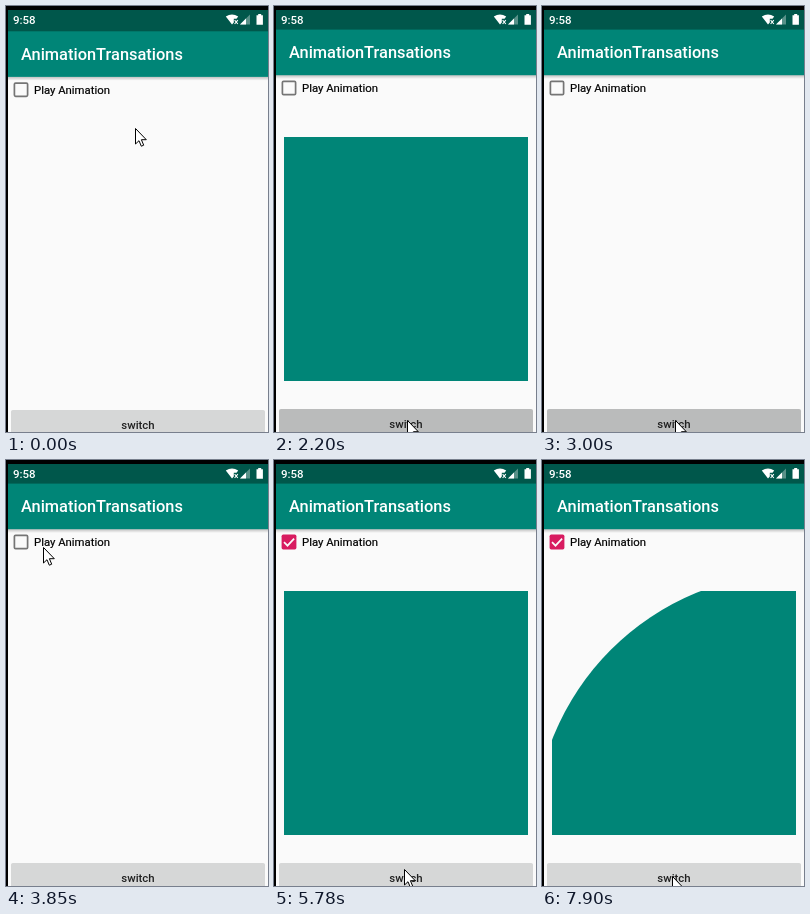
An HTML page for the animation above (8000 ms loop, 262x426 px).

```html
<!DOCTYPE html>
<html lang="en">
<head>
<meta charset="utf-8">
<title>Circular reveal</title>
<style>
  html, body { margin: 0; width: 100%; height: 100%; overflow: hidden; background: #000; }
  svg { display: block; width: 262px; height: 426px; font-family: Roboto, sans-serif; }
</style>
</head>
<body>
<svg viewBox="0 0 262 426">
  <defs>
    <linearGradient id="shade" x2="0" y2="1">
      <stop stop-color="#000" stop-opacity=".24"/>
      <stop offset="1" stop-color="#000" stop-opacity="0"/>
    </linearGradient>
    <clipPath id="hole"><circle id="reveal" cx="254" cy="375" r="0"/></clipPath>
  </defs>

  <rect width="262" height="426" fill="#000"/>
  <rect x="2" y="4" width="260" height="30" fill="#00574b"/>
  <rect x="2" y="60" width="260" height="366" fill="#fafafa"/>

  <g id="top">
    <rect x="2" y="69" width="260" height="4" fill="url(#shade)"/>
    <rect x="2" y="23.6" width="260" height="45.6" fill="#008577"/>
    <text x="15" y="52" font-size="16.4" font-weight="500" fill="#fff">AnimationTransations</text>

    <circle id="ripple" cx="15" cy="82" r="12.5" fill="#d81b60" opacity="0"/>
    <rect id="off" x="8.4" y="75.4" width="13.2" height="13.2" rx="1.2" fill="none" stroke="#757575" stroke-width="1.7"/>
    <g id="on">
      <rect x="7.6" y="74.6" width="14.8" height="14.8" rx="1.7" fill="#d81b60"/>
      <path d="M10 82.2l3.5 3.5 6.6-7" fill="none" stroke="#fafafa" stroke-width="1.7"/>
    </g>
    <text x="28" y="86.3" font-size="11.35" stroke="#000" stroke-width=".2">Play Animation</text>
  </g>

  <rect x="10" y="131" width="244" height="244" fill="#008577" clip-path="url(#hole)"/>

  <g id="bottom">
    <rect x="5" y="403.4" width="254" height="30" rx="2" fill="#000" opacity=".12"/>
    <rect x="5" y="403" width="254" height="30" rx="2" fill="#d6d7d7"/>
    <rect id="shadow" x="5" y="403" width="254" height="30" rx="2" opacity="0"/>
    <text x="132" y="422" font-size="11.4" font-weight="500" fill="#212121" text-anchor="middle">switch</text>
  </g>

  <g fill="#fff">
    <text x="7" y="18" font-size="11.5" font-weight="500">9:58</text>
    <path d="M219.8 10.6Q226 6.6 232.2 10.6L230.5 12.8H227.8V16.6L226 18.6Z"/>
    <path d="M228.6 14.2l3.2 3.8m0-3.8l-3.2 3.8" stroke="#fff" stroke-width="1.1"/>
    <path d="M234 18.5L244 8.5V18.5Z" opacity=".35"/>
    <path d="M234 18.5L240 12.5V18.5Z"/>
    <path d="M250.5 9.3h1.7v-1.2h3v1.2h1.7v9.4h-6.4Z"/>
  </g>

  <path id="cursor" d="M.5.5V16L4 12.7 6.3 18.2 8.7 17.2 6.4 11.7H11.3Z" fill="#fff" stroke="#000"/>
</svg>

<script>
const LOOP = 8000;
const FULL = Math.hypot(244, 244);
const CHECK = 4130;
const clicks = [2200, 3000, 5080, 6310];

// The pointer rests between moves; each move takes a few visible steps.
const home = { x: 129, y: 122 };
const moves = [
  { start: 120, end: 660, steps: 5, x: 65, y: 89 },
  { start: 940, end: 1360, steps: 4, x: 133, y: 414 },
  { start: 3430, end: 3850, steps: 4, x: 37, y: 87 },
  { start: 4270, end: 4680, steps: 4, x: 130, y: 402 },
  { start: 5780, end: 5930, steps: 2, x: 130, y: 416 }
];

const set = (id, name, value) => document.getElementById(id).setAttribute(name, value);
const clamp = p => Math.min(1, Math.max(0, p));
const ease = p => (1 - Math.cos(Math.PI * clamp(p))) / 2;
const snap = (t, start, step) => start + Math.floor((t - start) / step) * step;

function pointer(t) {
  let { x, y } = home;
  for (const move of moves) {
    const gap = (move.end - move.start) / (move.steps - 1);
    const p = ease((snap(t, move.start, gap) - move.start + gap) / (gap * move.steps));
    x += (move.x - x) * p;
    y += (move.y - y) * p;
  }
  return [Math.round(x), Math.round(y)];
}

// Press highlight: full, half, gone.
function press(t, start) {
  return t < start ? 0 : clamp(1 - (snap(t, start, 135) - start) / 270);
}

function radius(t) {
  if (t < clicks[0]) return 0;
  if (t < clicks[1]) return FULL + 1;
  if (t < clicks[2]) return 0;
  if (t < clicks[3]) return FULL * ease((snap(t, clicks[2], 135) - 5009) / 300);
  return FULL * (1 - ease((snap(t, clicks[3], 132) - 6260) / 5000));
}

function draw(t) {
  const early = t < 120;
  const checked = t >= CHECK;
  set('cursor', 'transform', `translate(${pointer(t)})`);
  set('shadow', 'opacity', .13 * Math.max(...clicks.map(c => press(t, c))));
  set('ripple', 'opacity', .26 * press(t, CHECK));
  set('reveal', 'r', radius(t));
  set('on', 'visibility', checked ? 'visible' : 'hidden');
  set('off', 'visibility', checked ? 'hidden' : 'visible');
  set('top', 'transform', `translate(0 ${early ? 1.7 : 0})`);
  set('bottom', 'transform', `translate(0 ${early ? 1 : 0})`);
}

const begin = performance.now();
function frame() {
  draw((performance.now() - begin) % LOOP);
  requestAnimationFrame(frame);
}
frame();
</script>
</body>
</html>
```
